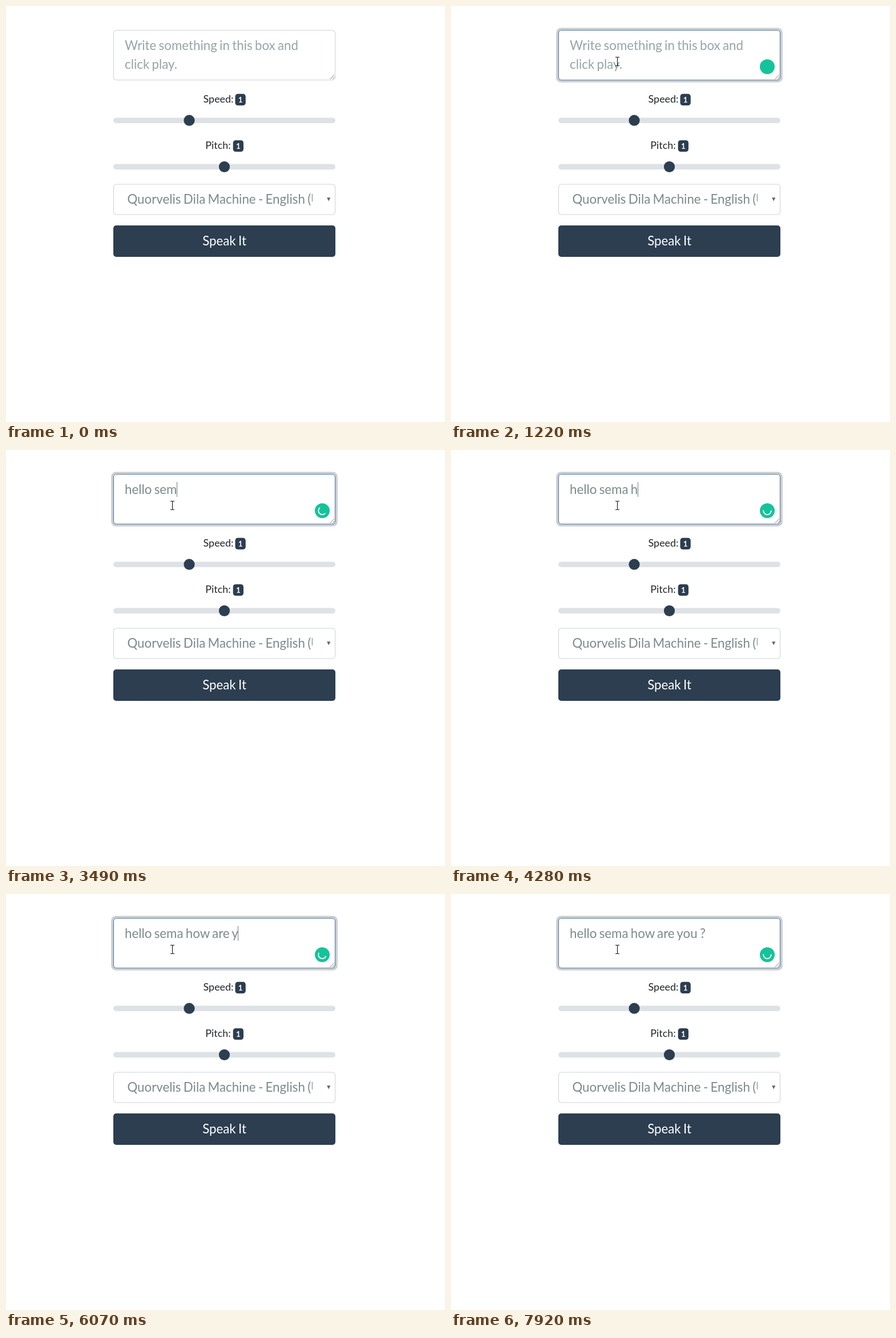
An HTML page that plays this animation: 769 px wide and 728 px high, repeating every 8 s.

```html
<!DOCTYPE html>
<html lang="en">
<head>
<meta charset="utf-8">
<title>Text to speech form</title>
<style>
  html, body { margin: 0; width: 100%; height: 100%; overflow: hidden; background: #fff; }
  svg { display: block; width: 769px; height: 728px; font-family: Lato, sans-serif; }
  text { white-space: pre; }
  .big { font-size: 22.3px; word-spacing: -.063em; }
  .label { font-size: 17.9px; fill: #212529; }
  .badge { font-size: 13.4px; font-weight: 700; fill: #fff; text-anchor: middle; }
  .dark { fill: #2c3e50; }
  .track { fill: #dee2e6; }
  .input { fill: #7b8a8b; }
  .hint { fill: #95a5a6; }
</style>
</head>
<body>
<svg viewBox="0 0 769 728">
  <defs>
    <clipPath id="selectClip"><rect x="200" y="314" width="337" height="50"/></clipPath>
  </defs>

  <rect id="ring" x="186.1" y="40.1" width="392.8" height="91.8" rx="6.5" fill="none" stroke="#2c3e50" stroke-opacity=".25" stroke-width="3.8"/>
  <rect id="box" x="188.5" y="42.5" width="388" height="87" rx="4.8" fill="#fff" stroke="#ced4da" stroke-width="1.1"/>
  <g id="hint" class="big hint">
    <text x="208" y="77">Write something in this box and</text>
    <text x="208" y="110">click play.</text>
  </g>
  <text id="typed" class="big input" x="208" y="77"></text>
  <rect id="caret" y="56" width="1" height="26" fill="#6f7d7e"/>
  <path d="M567.5 128 575 120.5M572 128 575.5 124.5" stroke="#777" stroke-width="1" fill="none"/>
  <g id="badge">
    <circle cx="554" cy="106.3" r="13" fill="#15c39a"/>
    <path id="arc" d="M6.8 0A6.8 6.8 0 0 1 -6.8 0" fill="none" stroke="#fff" stroke-width="1.9" stroke-linecap="round"/>
  </g>

  <text class="label" x="345.6" y="169">Speed:</text>
  <rect class="dark" x="401.5" y="153.8" width="18.3" height="20.2" rx="4.6"/>
  <text class="badge" x="410.6" y="169">1</text>
  <rect class="track" x="188" y="195.4" width="389" height="9.6" rx="4.8"/>
  <circle class="dark" cx="321" cy="200.2" r="9.6"/>

  <text class="label" x="349.3" y="250">Pitch:</text>
  <rect class="dark" x="397.7" y="234.9" width="18.3" height="20.2" rx="4.6"/>
  <text class="badge" x="406.8" y="250">1</text>
  <rect class="track" x="188" y="276.6" width="389" height="9.6" rx="4.8"/>
  <circle class="dark" cx="382.5" cy="281.4" r="9.6"/>

  <rect x="188.5" y="312" width="388" height="53" rx="4.8" fill="#fff" stroke="#ced4da" stroke-width="1.1"/>
  <text class="big input" x="212.4" y="346" clip-path="url(#selectClip)">Quorvelis Dila Machine - English (United States)</text>
  <path d="M562.1 335.2H568.3L565.2 341.6Z" fill="#666"/>

  <rect class="dark" x="188" y="384" width="389" height="55" rx="5"/>
  <text class="big" x="382.5" y="419" fill="#fff" text-anchor="middle">Speak It</text>

  <g id="pointer">
    <path id="beam" d="M-3.5 -7.5H-1L0 -6.8 1 -7.5H3.5M0 -6.8V6.8M-3.5 7.5H-1L0 6.8 1 7.5H3.5" fill="none" stroke="#111" stroke-width="1.1"/>
    <path id="arrow" d="M0 0V16L3.7 12.5 6.2 18.2 8.6 17.1 6.2 11.6H11.3Z" fill="#fff" stroke="#111" stroke-width="1"/>
    <path id="hand" d="M-1.5 1.5Q0 -1 1.5 1.5V7Q4 6 5 7.7 7.5 7 8.2 8.6 10.5 8.4 10.5 11V14L8.5 19H0L-5 12.5Q-5 9.5 -1.5 12Z" fill="#fff" stroke="#111" stroke-width="1"/>
  </g>
</svg>
<script>
  const LOOP = 8000, BLINK = 550, FOCUS = 670, SPIN = 3020;
  const MESSAGE = "hello sema how are you ?";
  const KEYS = [2000, 2090, 2320, 2550, 2700, 3020, 3180, 3330, 3490, 3650, 3800,
    4200, 4350, 4500, 4900, 5440, 5600, 5750, 5900, 6060, 6290, 6450, 6610, 7150];
  // time and rotation of the spinner
  const TURNS = [[3020, -500], [4280, 0], [5290, 450], [6840, 1035], [8000, 1470]];

  const el = id => document.getElementById(id);
  const show = (id, on) => el(id).setAttribute("visibility", on ? "visible" : "hidden");
  const clamp = v => Math.max(0, Math.min(1, v));
  const mix = (a, b, k) => a + (b - a) * k;

  function along(points, t) {
    let i = 1;
    while (i < points.length - 1 && t > points[i][0]) i++;
    const [t0, a] = points[i - 1], [t1, b] = points[i];
    return mix(a, b, clamp((t - t0) / (t1 - t0)));
  }

  function drawPointer(t) {
    const k = clamp((t - 70) / 520);
    const e = k * k * (3 - 2 * k);
    const x = mix(333, 291.5, e), y = mix(398, 97, e);
    const on = t >= 70;
    el("pointer").setAttribute("transform", `translate(${x} ${y})`);
    show("beam", on && y < 130);
    show("arrow", on && y >= 130 && y < 384);
    show("hand", on && y >= 384);
  }

  function drawField(t) {
    const count = KEYS.filter(k => k <= t).length;
    const typed = el("typed");
    typed.textContent = MESSAGE.slice(0, count);
    show("hint", count === 0);

    const last = count ? KEYS[count - 1] : FOCUS;
    const width = count ? typed.getComputedTextLength() : 0;
    el("caret").setAttribute("x", Math.floor(208 + width));
    show("caret", t >= FOCUS && (t - last) % (2 * BLINK) < BLINK);

    const focus = clamp((t - FOCUS) / 170);
    const rgb = [[206, 89], [212, 126], [218, 162]].map(([a, b]) => Math.round(mix(a, b, focus)));
    el("box").setAttribute("stroke", `rgb(${rgb})`);
    el("ring").setAttribute("opacity", focus);
  }

  function drawBadge(t) {
    show("badge", t >= 750);
    show("arc", t >= SPIN);
    el("arc").setAttribute("transform", `translate(554 106.3) rotate(${along(TURNS, t)})`);
  }

  function render(t) {
    drawPointer(t);
    drawField(t);
    drawBadge(t);
  }

  const start = performance.now();
  function tick() {
    render((performance.now() - start) % LOOP);
    requestAnimationFrame(tick);
  }
  tick();
</script>
</body>
</html>
```
